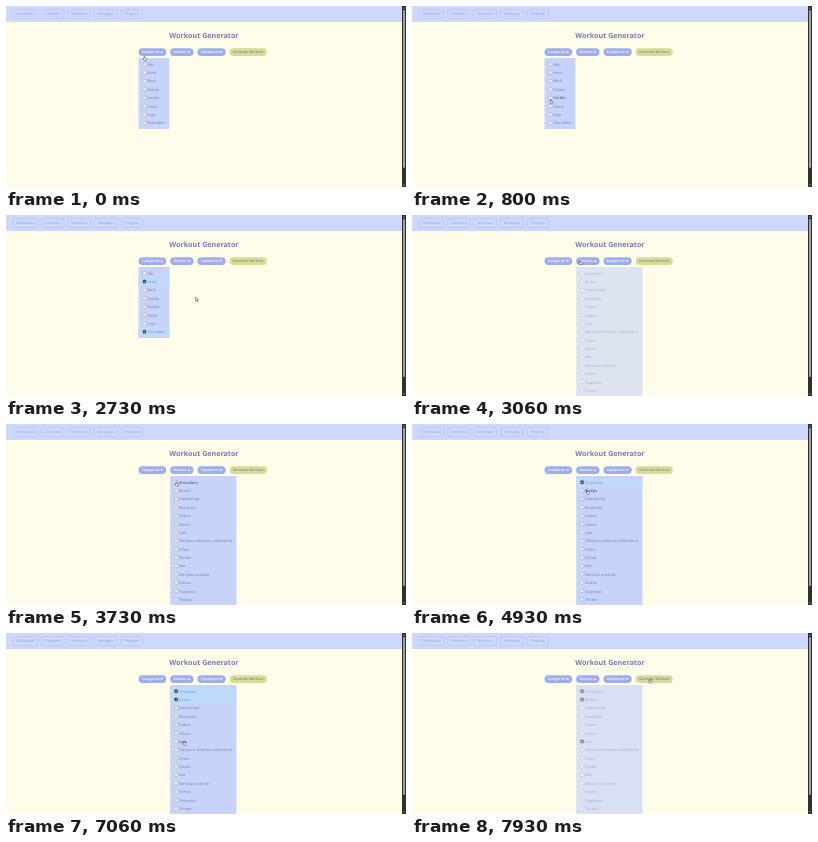
These frames come from a looping animation (400x181 px, 8000 ms). An HTML page:

```html
<!DOCTYPE html>
<html lang="en">
<head>
<meta charset="utf-8">
<title>Workout Generator</title>
<style>
  html, body { margin: 0; width: 100%; height: 100%; overflow: hidden; background: #fffcea; }
  svg { display: block; width: 100vw; height: 100vh; }
  text { font-family: "Open Sans", "Noto Sans", sans-serif; text-rendering: geometricPrecision; }
  .nav text { font-size: 3.55px; fill: #929fe2; }
  .nav rect { fill: none; stroke: #b2bff3; stroke-width: .6; }
  .title { font-size: 7.15px; font-weight: 700; fill: #757cb8; text-anchor: middle; }
  .pill text { font-size: 3.45px; font-weight: 600; fill: #fff; }
  .pill rect { fill: #9fadee; }
  .pill path { fill: #fff; }
  .pill.go rect { fill: #dadb93; }
  .pill.go text { fill: #7d83a8; }
  .pill.go.hover rect { fill: #d6d7a0; }
  .panel { fill: #c8d3f9; }
  .row text { font-size: 3.9px; fill: #7a81b4; }
  .row .back { fill: none; }
  .row .box { fill: #fff; stroke: #8c90a8; stroke-width: .45; }
  .row .tick { fill: none; stroke: none; stroke-width: .6; }
  .row.checked .back { fill: #bfdafa; }
  .row.checked text { fill: #7096df; }
  .row.checked .box { fill: #303a55; stroke: #303a55; }
  .row.checked .tick { stroke: #fff; }
  .row.hover text { fill: #59608f; font-weight: 600; }
  .closing .row .back { fill: none; }
  .closing .row text { fill: #7a81b4; }
  .cursor { fill: #fff; stroke: #333; stroke-width: .5; stroke-linejoin: round; }
</style>
</head>
<body>
<svg id="stage" viewBox="0 0 400 181" preserveAspectRatio="none"></svg>
<script>
const LOOP = 8000, STEP = 1000 / 15;
const ROW_TOP = 54.1, ROW_HEIGHT = 8.37;
const stage = document.getElementById('stage');

function add(parent, tag, attrs = {}, text = '') {
  const node = document.createElementNS('http://www.w3.org/2000/svg', tag);
  for (const key in attrs) node.setAttribute(key, attrs[key]);
  node.textContent = text;
  return parent.appendChild(node);
}
const rect = (parent, x, y, width, height, attrs) =>
  add(parent, 'rect', { x, y, width, height, ...attrs });

// A label with a frame that fits its text; returns the frame's width.
function addButton(parent, label, x, y, height, left, right, radius) {
  const frame = rect(parent, x, y, 0, height, { rx: radius });
  const text = add(parent, 'text', { x: x + left, y: y + height / 2 + 1.25 }, label);
  const width = text.getComputedTextLength() + left + right;
  frame.setAttribute('width', width);
  return width;
}

// Page chrome
rect(stage, 0, 0, 400, 181, { fill: '#fffcea' });
rect(stage, 0, 0, 396, 16, { fill: '#cdd8fc' });
rect(stage, 396, 0, 4, 181, { fill: '#303030' });
rect(stage, 397, 4, 2, 158, { fill: '#a0a0a0', rx: 1 });
add(stage, 'path', { d: 'M397 2.6h2l-1-1.4ZM397 178.4h2l-1 1.4Z', fill: '#a0a0a0' });

const nav = add(stage, 'g', { class: 'nav' });
let navX = 6.8;
for (const label of ['Dashboard', 'Generate', 'Workouts', 'Messages', 'Progress'])
  navX += addButton(nav, label, navX, 3.4, 9.2, 3.4, 3.4, 1.5) + 3.9;

add(stage, 'text', { class: 'title', x: 198, y: 32.2 }, 'Workout Generator');

let pillX = 132.5;
function makePill(label, kind = '') {
  const group = add(stage, 'g', { class: 'pill ' + kind });
  const x = pillX, width = addButton(group, label, x, 42.2, 7.8, 3.3, kind ? 3.3 : 6.8, 3.9);
  pillX += width + 3.9;
  const arrow = kind ? null : add(group, 'path', { d: 'M-1.2-1H1.2L0 1.1Z' });
  const turn = open => arrow.setAttribute('transform',
    `translate(${x + width - 4.6} 46.1) rotate(${180 * open})`);
  if (arrow) turn(0);
  return { group, turn, x };
}

function makeMenu({ pill, width, labels, checks, opens, closes }) {
  const x = pill.x, group = add(stage, 'g');
  rect(group, x, 52, width, labels.length * ROW_HEIGHT + 4, { class: 'panel' });
  const rows = labels.map((label, i) => {
    const top = ROW_TOP + i * ROW_HEIGHT, boxX = x + 4.5, boxY = top + 2.6;
    const row = add(group, 'g', { class: 'row' });
    rect(row, x, top, width, ROW_HEIGHT, { class: 'back' });
    rect(row, boxX, boxY, 3, 3, { class: 'box', rx: .5 });
    add(row, 'path', { class: 'tick', d: `M${boxX + .6} ${boxY + 1.6}l.7 .7 1.2-1.6` });
    add(row, 'text', { x: boxX + 4.4, y: top + 5.6 }, label);
    return row;
  });
  const rowPoint = (i, dx = 6.3) => [x + dx, ROW_TOP + (i + .45) * ROW_HEIGHT];
  return { pill, group, rows, x, width, checks, opens, closes, rowPoint };
}

const categoriesPill = makePill('Categories');
const musclesPill = makePill('Muscles');
makePill('Equipment');
const generate = makePill('Generate Workout', 'go');

// checks: row index -> time ticked
const categories = makeMenu({
  pill: categoriesPill, width: 31, opens: -1000, closes: 2735, checks: { 1: 1260, 7: 2200 },
  labels: ['Abs', 'Arms', 'Back', 'Calves', 'Cardio', 'Chest', 'Legs', 'Shoulders']
});
const muscles = makeMenu({
  pill: musclesPill, width: 66.3, opens: 3000, closes: 7900, checks: { 0: 3930, 1: 5060, 6: 7795 },
  labels: ['Shoulders', 'Biceps', 'Hamstrings', 'Brachialis', 'Calves', 'Glutes', 'Lats',
    'Obliquus externus abdominis', 'Chest', 'Quads', 'Abs', 'Serratus anterior',
    'Soleus', 'Trapezius', 'Triceps']
});

const hand = add(stage, 'path', { class: 'cursor',
  d: 'M-.4 .2Q0-.3 .4 .2V1.6L2 2Q2.4 2.3 2.2 2.9L1.8 4.2H0L-1.2 2.6Q-1 2-.4 2.5Z' });
const pointer = add(stage, 'path', { class: 'cursor',
  d: 'M0 0V4L.9 3.2 1.6 4.7 2.3 4.4 1.6 2.9H2.8Z' });

// Cursor moves: start, end, destination
const home = [138.4, 50.3];
const moves = [
  [340, 650, categories.rowPoint(5)],
  [700, 1060, categories.rowPoint(1)],
  [1500, 1600, categories.rowPoint(2)],
  [1670, 2060, categories.rowPoint(7)],
  [2260, 2660, [189.6, 82]],
  [2740, 3000, [168, 45.5]],
  [3400, 3730, muscles.rowPoint(0)],
  [4140, 4330, muscles.rowPoint(1, 11)],
  [5130, 5460, muscles.rowPoint(3, 12)],
  [5870, 6060, muscles.rowPoint(2, 12.5)],
  [6600, 7060, muscles.rowPoint(6, 13.7)],
  [7800, 7930, [237.7, 46]]
];

const clamp = p => Math.min(1, Math.max(0, p));
const fade = (t, start) => 1 - (1 - clamp((t - start) / 260)) ** 3;

function cursorAt(t) {
  let [x, y] = home;
  for (const [start, end, [toX, toY]] of moves) {
    const p = clamp((t - start) / (end - start)), s = p * p * (3 - 2 * p);
    x += (toX - x) * s;
    y += (toY - y) * s;
  }
  return [x, y];
}

function draw(t) {
  const [x, y] = cursorAt(t);
  let clickable = y < 52;
  for (const { pill, group, rows, x: left, width, checks, opens, closes } of [categories, muscles]) {
    const open = fade(t, opens) - fade(t, closes);
    group.setAttribute('opacity', open);
    group.classList.toggle('closing', t > closes);
    pill.turn(open);
    rows.forEach((row, i) => {
      const offset = y - ROW_TOP - i * ROW_HEIGHT;
      const hover = open > 0 && x > left && x < left + width && offset >= 0 && offset < ROW_HEIGHT;
      row.classList.toggle('hover', hover);
      row.classList.toggle('checked', t >= checks[i]);
      clickable ||= hover;
    });
  }
  generate.group.classList.toggle('hover', x > generate.x && y < 50);
  for (const shape of [hand, pointer]) {
    shape.setAttribute('transform', `translate(${x} ${y})`);
    shape.setAttribute('display', (shape === hand) === clickable ? 'inline' : 'none');
  }
}

const begin = performance.now();
function tick() {
  const t = (performance.now() - begin) % LOOP;
  draw(Math.floor((t + 7) / STEP) * STEP % LOOP); // 15 pictures a second
  requestAnimationFrame(tick);
}
tick();
</script>
</body>
</html>
```
